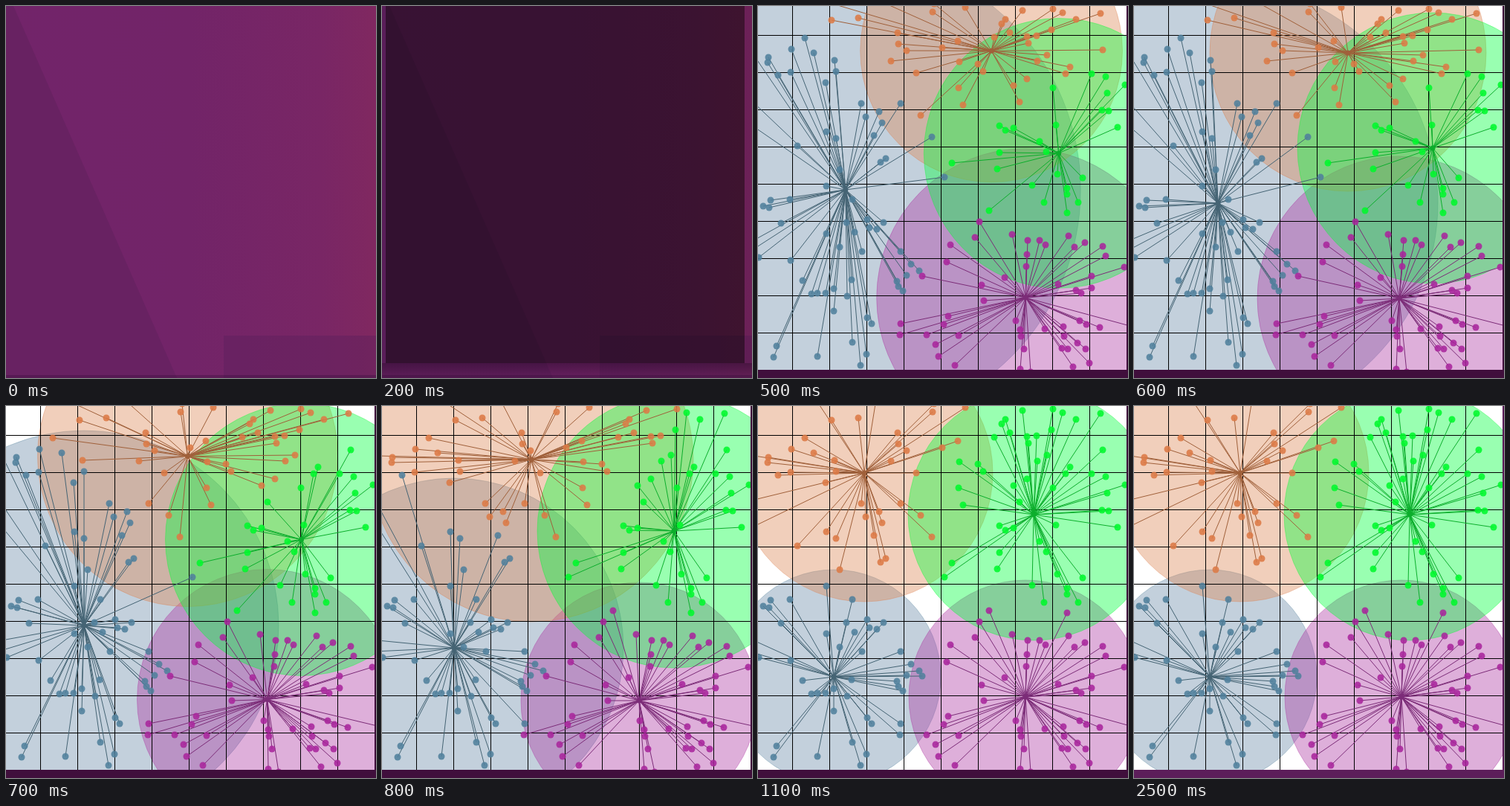
Write an HTML page that moves like this. It is 498 px wide and 500 px high and loops after 2700 ms.

```html
<!DOCTYPE html>
<html lang="en">
<head>
<meta charset="utf-8">
<title>Clustering</title>
<style>
  html, body { margin: 0; width: 100%; height: 100%; overflow: hidden; background: #72246a; }
  svg { display: block; width: 498px; height: 500px; }
</style>
</head>
<body>
<svg viewBox="0 0 498 500" xmlns="http://www.w3.org/2000/svg">
  <defs>
    <linearGradient id="wall">
      <stop offset="0" stop-color="#72246a"/>
      <stop offset=".5" stop-color="#722468"/>
      <stop offset=".85" stop-color="#792665"/>
      <stop offset="1" stop-color="#802860"/>
    </linearGradient>
    <linearGradient id="drop" x2="0" y2="1">
      <stop offset="0" stop-color="#1c0420" stop-opacity=".45"/>
      <stop offset="1" stop-color="#1c0420" stop-opacity=".12"/>
    </linearGradient>
    <clipPath id="plotClip"><rect width="496" height="489"/></clipPath>
  </defs>
  <rect width="498" height="500" fill="url(#wall)"/>
  <path d="M0 0H10L230 500H0Z" fill="#682262"/>
  <rect x="293" y="443" width="205" height="57" fill="#5c205c" opacity=".45"/>
  <rect y="496" width="498" height="4" fill="#3c1040" opacity=".4"/>
  <g id="opening">
    <path d="M0 0H5V480H0ZM488 0H498V480H488Z" fill="#2a0a3a" opacity=".22"/>
    <rect y="480" width="498" height="20" fill="url(#drop)"/>
    <rect x="5" width="483" height="480" opacity=".51"/>
  </g>
  <g id="frame">
    <rect id="edge" width="498" height="500"/>
    <rect id="back" width="496" height="489"/>
    <g id="plot" clip-path="url(#plotClip)"></g>
  </g>
</svg>
<script>
const LOOP = 2700;
const $ = id => document.getElementById(id);

// Each path holds the centre and radius [x, y, r] at three key iterations.
const groups = [
  { fill: 'rgb(105,138,167)', dot: '#50809c', line: '#456474',
    path: [[113, 265, 296], [97, 325, 228], [102, 364, 144]] },
  { fill: 'rgb(172,55,162)', dot: '#a8269c', line: '#7c2c78',
    path: [[357, 393, 191], [346, 396, 159], [360, 391, 157]] },
  { fill: 'rgb(220,135,85)', dot: '#dc7a45', line: '#a0603a',
    path: [[288, 63, 186], [201, 72, 218], [143, 90, 173]] },
  { fill: 'rgb(0,255,60)', dot: '#00f82c', line: '#0cae2c',
    path: [[402, 191, 182], [393, 168, 184], [371, 146, 169]] }
];

// Start time and position along the path.
const steps = [[500, -0.3], [600, 0], [700, 0.5], [800, 1], [1000, 1.5], [1100, 2]];

let seed = 4217;
const random = () => (seed = (seed * 16807) % 2147483647) / 2147483647;
const dist = (a, b) => Math.hypot(a[0] - b[0], a[1] - b[1]);

function centresAt(pos) {
  const i = pos < 1 ? 0 : 1;
  return groups.map(({ path }) => path[i].map((v, j) => v + (path[i + 1][j] - v) * (pos - i)));
}

function nearest(p, centres) {
  const gaps = centres.map(c => dist(p, c));
  return gaps.indexOf(Math.min(...gaps));
}

// Even random spread, kept inside the settled discs.
function scatter(total) {
  const list = [], settled = centresAt(2);
  while (list.length < total) {
    const p = [Math.round(random() * 530 - 16), Math.round(random() * 506 - 14)];
    const c = settled[nearest(p, settled)];
    if (dist(p, c) < c[2] - 2 && list.every(q => dist(p, q) > 7)) list.push(p);
  }
  return list;
}
const points = scatter(190);

function gridPath() {
  let d = '';
  for (let i = 0; i < 9; i++) d += `M${46.5 + i * 50} 0V489M0 ${39.5 + i * 50}H496`;
  return d;
}

// Points belong to the centres of the step before, until the last one settles.
function drawStep([, pos], i) {
  const centres = centresAt(pos);
  const settled = i === steps.length - 1;
  const basis = centresAt(settled ? pos : steps[Math.max(0, i - 1)][1]);
  const members = groups.map(() => []);
  points.forEach(p => members[nearest(p, basis)].push(p));
  const discs = groups.map((g, k) => {
    const [x, y, r] = centres[k];
    return `<circle cx="${x}" cy="${y}" r="${r}" fill="${g.fill}" fill-opacity=".4" stroke="${g.dot}" stroke-opacity=".35"/>`;
  });
  const stars = groups.map((g, k) => {
    const [x, y] = centres[k];
    const rays = members[k].map(p => `M${x} ${y}L${p}`).join('');
    const dots = members[k].map(p => `<circle cx="${p[0]}" cy="${p[1]}" r="4.5"/>`).join('');
    return `<path d="${rays}" stroke="${g.line}"/><g fill="${g.dot}" fill-opacity=".88">${dots}</g>` +
      `<circle cx="${x}" cy="${y}" r="3.5" fill="${g.line}"/>`;
  });
  return discs.join('') + `<path d="${gridPath()}" stroke="#000"/>` + stars.join('');
}
const drawings = steps.map(drawStep);

const show = (id, on) => $(id).setAttribute('visibility', on ? 'visible' : 'hidden');
let current = null;

function render(t) {
  show('opening', t >= 200 && t < 300);
  show('frame', t >= 300);
  $('edge').setAttribute('fill', t < 2500 ? '#400f3c' : '#5c1e5a');
  $('back').setAttribute('fill', t < 500 ? '#000' : '#fff');
  const index = steps.filter(s => t >= s[0]).length - 1;
  if (index !== current) {
    current = index;
    $('plot').innerHTML = drawings[index] || '';
  }
}

const start = performance.now();
function tick() {
  render((performance.now() - start) % LOOP);
  requestAnimationFrame(tick);
}
render(0);
requestAnimationFrame(tick);
</script>
</body>
</html>
```
